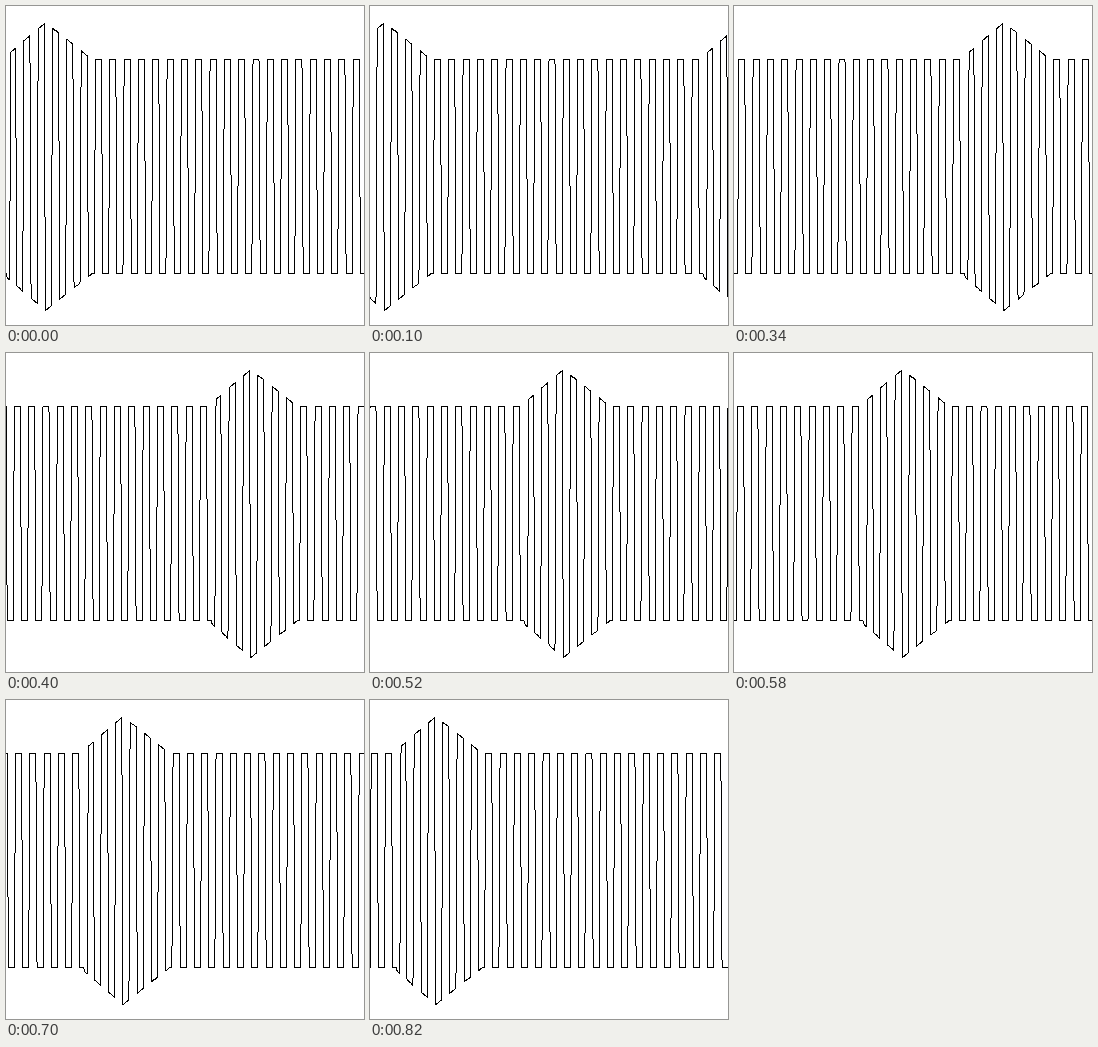
An HTML page with a canvas for the animation above (880 ms loop, 358 by 319 pixels).

```html
<!DOCTYPE html>
<html lang="en">
<head>
<meta charset="utf-8">
<title>Travelling pulse</title>
<style>
  html, body { margin: 0; width: 100%; height: 100%; overflow: hidden; background: #fff; }
  canvas { display: block; image-rendering: pixelated; }
</style>
</head>
<body>
<canvas id="stage" width="358" height="319"></canvas>
<script>
const ctx = document.getElementById('stage').getContext('2d');
const WIDTH = 358, HEIGHT = 319, MIDDLE = 160;
const SAMPLES = 300, SPACING = WIDTH / SAMPLES, START_X = 1.2;
const STEPS = 14, FIRST_MS = 100, STEP_MS = 60;
const LOOP_MS = FIRST_MS + (STEPS - 1) * STEP_MS;

// Square wave of 12 samples per period, swollen by a triangular pulse.
function signal(index) {
  const i = (index + SAMPLES) % SAMPLES;
  const amplitude = i < 32 ? 111.2 + 1.026 * i : Math.max(107, 144 - 0.943 * (i - 32));
  const isHigh = (i + 10) % 12 < 6 && i !== 2;
  return MIDDLE + (isHigh ? -amplitude : amplitude);
}

// One pixel wide line without smoothing.
function line(x0, y0, x1, y1) {
  const n = Math.ceil(Math.max(Math.abs(x1 - x0), Math.abs(y1 - y0)));
  for (let i = 0; i <= n; i++) {
    const x = x0 + (x1 - x0) * i / n, y = y0 + (y1 - y0) * i / n;
    ctx.fillRect(Math.floor(x), Math.round(y), 1, 1);
  }
}

// The wave moves left by whole samples.
function draw(step) {
  ctx.fillStyle = '#fff';
  ctx.fillRect(0, 0, WIDTH, HEIGHT);
  ctx.fillStyle = '#000';
  const roll = Math.floor(step * SAMPLES / STEPS);
  for (let i = -3; i <= SAMPLES; i++) {
    const x = START_X + i * SPACING;
    line(x, signal(i + roll), x + SPACING, signal(i + roll + 1));
  }
}

let shown = -1;
function tick() {
  const t = performance.now() % LOOP_MS;
  const step = t < FIRST_MS ? 0 : 1 + Math.floor((t - FIRST_MS) / STEP_MS);
  if (step !== shown) draw(shown = step);
  requestAnimationFrame(tick);
}
tick();
</script>
</body>
</html>
```
